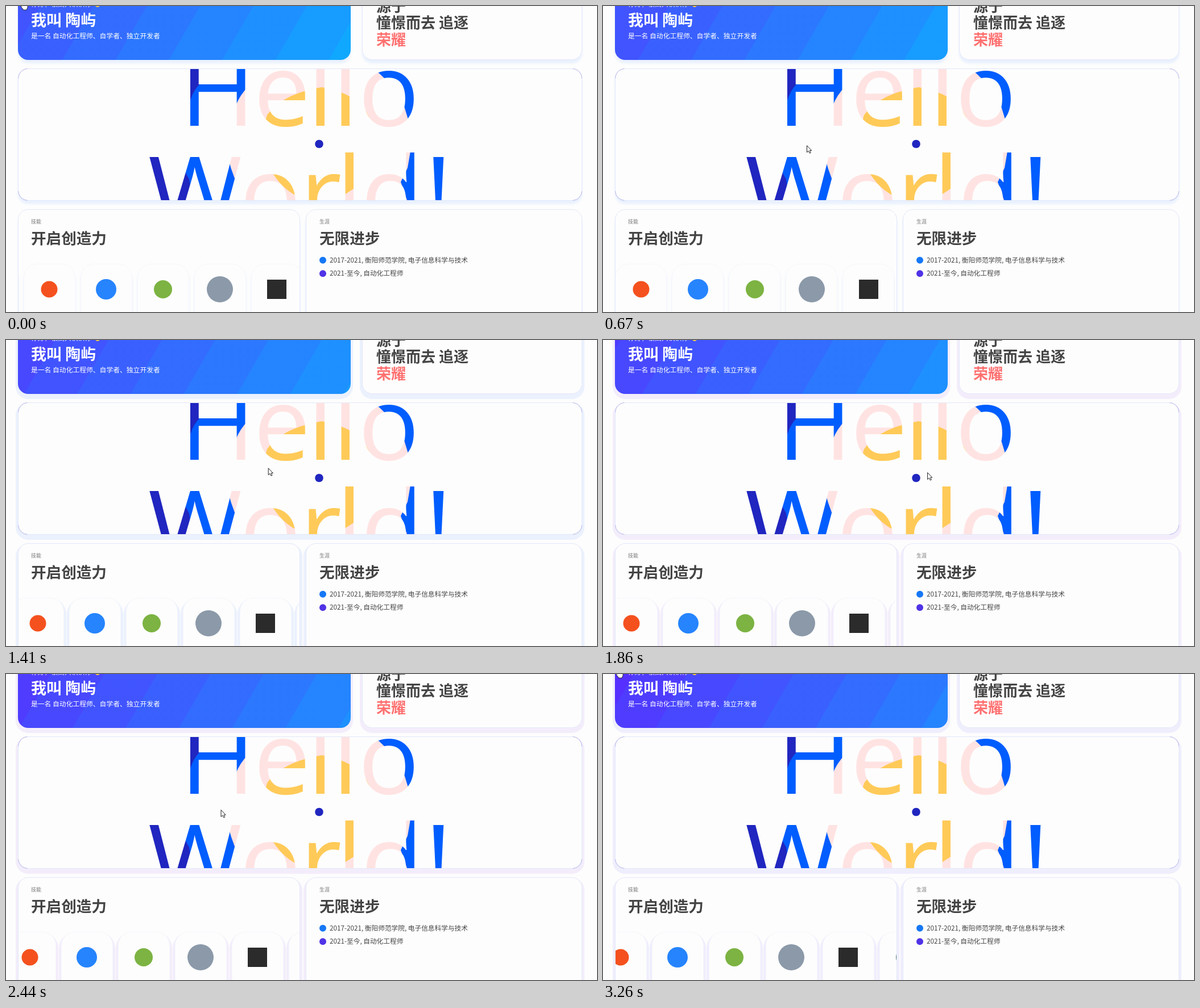
Animation of 1039x539 px, one loop 3.34 s. Source, as an HTML page:

```html
<!DOCTYPE html>
<html lang="zh">
<head>
<meta charset="utf-8">
<style>
html, body { margin: 0; width: 100%; height: 100%; overflow: hidden; background: #fdfdfd; }
#stage { position: absolute; width: 1039px; height: 539px; overflow: hidden; }
.card, .tile { position: absolute; box-sizing: border-box; background: #fdfdfd; border: 1px solid #e3e8fa; box-shadow: var(--shadow); }
.card { border-radius: 18px; }
.tile { top: 454px; width: 91px; height: 130px; border-radius: 24px; border-color: #f6f7fc; }
.tile i { position: absolute; left: 50%; top: 44px; transform: translate(-50%, -50%); }
#hero { border: 0; }
#strip { position: absolute; left: 22px; top: 0; width: 494px; height: 539px; overflow: hidden; }
svg { position: absolute; left: 0; top: 0; font-family: "Noto Sans CJK SC", "Noto Sans CJK", sans-serif; }
.big { font-weight: 700; font-size: 26.6px; fill: #444; }
.list { font-size: 11.7px; fill: #444; }
.label { font-size: 9px; fill: #777; }
.hello { font: 178px "Open Sans", sans-serif; }
</style>
</head>
<body>
<div id="stage">
  <div class="card" id="hero" style="left:21px;top:-40px;width:585px;height:134.5px"></div>
  <div class="card" style="left:626px;top:-40px;width:387px;height:135px"></div>
  <div class="card" style="left:21px;top:110px;width:992px;height:233px"></div>
  <div class="card" style="left:21px;top:358px;width:496px;height:220px"></div>
  <div class="card" style="left:527px;top:358px;width:486px;height:220px"></div>
  <div id="strip"></div>
  <svg width="1039" height="539">
    <defs>
      <clipPath id="words">
        <text class="hello" y="211" x="306.5 435.2 530.2 574.2 619.2">Hello</text>
        <text class="hello" y="393" x="250 411.2 517.2 581.2 624 736.5">World!</text>
      </clipPath>
      <clipPath id="panel"><rect x="22" y="111" width="990" height="231" rx="17"/></clipPath>
    </defs>
    <g fill="#fff">
      <text x="44" y="1" font-size="11.8">你好，很高兴认识你</text>
      <ellipse cx="161" cy="-2" rx="4" ry="4" fill="#ffc93c"/>
      <text x="44" y="35" font-size="27" font-weight="700">我叫 陶屿</text>
      <text x="44" y="56.5" font-size="11.8">是一名 自动化工程师、自学者、独立开发者</text>
    </g>
    <g class="big" style="font-size:26px">
      <text x="651" y="10">源于</text>
      <text x="651" y="39">憧憬而去 追逐</text>
      <text x="651" y="68.500" fill="#ff7070">荣耀</text>
    </g>
    <g clip-path="url(#panel)">
      <g clip-path="url(#words)">
        <rect x="240" y="110" width="560" height="235" fill="#ffe3e2"/>
        <path fill="#005dff" d="M310 110H424V144Q412 156 404 175V215H310Z
          M640 105Q690 145 701 180L707 200H740V105Z
          M245 250H385L396 287L405 312L410 345H245Z
          M712 250L706 285L694 310L706 345H800V250Z"/>
        <path fill="#2026bf" d="M310 110H340V138Q330 148 324 166H310Z
          M240 250H290L322 305L328 345H240Z"/>
        <path fill="#ffca58" d="M452 216L459 192Q485 155 555 143Q605 152 629 178L642 203L640 216Z
          M466 290Q485 322 512 335L530 345H570L597 331L611 322L625 250H470Z"/>
      </g>
      <circle cx="550.5" cy="243" r="7.3" fill="#2026bf"/>
    </g>
    <path fill="none" stroke="#b9b9ec" d="M21.5 127.500a17 17 0 0 1 16-17M996.500 110.500a17 17 0 0 1 16 17M1012.500 326a17 17 0 0 1-16 16.500M37.500 342.500a17 17 0 0 1-16-16.500"/>
    <text class="label" x="44" y="383.400">技能</text>
    <text class="big" x="44" y="419">开启创造力</text>
    <text class="label" x="551" y="383.400">生涯</text>
    <text class="big" x="551" y="419">无限进步</text>
    <circle cx="557" cy="447.700" r="6" fill="#1677f5"/>
    <circle cx="557" cy="471.200" r="6" fill="#5033e6"/>
    <text class="list" x="569" y="451.500">2017-2021, 衡阳师范学院, 电子信息科学与技术</text>
    <text class="list" x="569" y="475">2021-至今, 自动化工程师</text>
    <g id="cursor" stroke-linejoin="round">
      <path id="arrow" fill="#fff" stroke="#222" d="M.5.5V12.500L3.300 10L5.200 14L7.200 13.100L5.400 9.200H8.700Z"/>
      <path id="hand" fill="#fff" stroke="#222" d="M3 10V2Q4.500 0 6 2V7L12 9V13L10 17H5L0 11Q1 9 3 10Z"/>
    </g>
  </svg>
</div>
<script>
const LOOP = 3340, STEP = 63.3;
const $ = id => document.getElementById(id);

// colour, size, corner rounding of each icon
const icons = [
  ['#2b2b2b', 30, 0], ['#f4511e', 29, 50], ['#2684ff', 36, 50], ['#7cb342', 32, 50],
  ['#8b99a9', 46, 50], ['#2b2b2b', 34, 0], ['#4c7a80', 32, 50]
];
const tiles = icons.map(([color, size, round]) => {
  const tile = document.createElement('div');
  tile.className = 'tile';
  tile.innerHTML = `<i style="width:${size}px;height:${size}px;background:${color};border-radius:${round}%"></i>`;
  $('strip').append(tile);
  return tile;
});

// time, x, y of the pointer tip
const route = [
  [0, 26, -10], [670, 361.5, 248], [1410, 457.5, 225], [1860, 572, 233],
  [2440, 376, 239], [2880, 44, -2], [3260, 23, -10], [LOOP, 23, -10]
];
function pointer(t) {
  const i = route.findIndex((p, k) => k && t <= p[0]);
  const a = route[i - 1], b = route[i], f = (t - a[0]) / (b[0] - a[0]);
  return [a[1] + (b[1] - a[1]) * f, a[2] + (b[2] - a[2]) * f];
}

// diagonal bands of blue that drift to the right
function bands(sec) {
  const edge = green => (green - 82 + 10.8 * sec) / 0.148;
  const stops = [];
  for (let g = 36; g <= 180; g += 12) {
    const red = 82 - (g - 54) * 0.58;
    stops.push(`rgb(${red},${g},255) ${edge(g - 6)}px ${edge(g + 6)}px`);
  }
  return `linear-gradient(120deg, ${stops})`;
}

function shadow(t) {
  if (t < 1050) return '0 6px 4px 0 #e9f1fe';
  const color = t < 1640 ? '#ebf1fd' : t < 2650 ? '#f3edfb' : '#efeefd';
  return `0 5px 1px 4px ${color}`;
}

function draw(now) {
  const raw = now % LOOP;
  const t = Math.max(0, Math.floor((raw - 17) / STEP) * STEP + 30);
  $('hero').style.background = bands(t / 1000);
  $('stage').style.setProperty('--shadow', shadow(t));
  tiles.forEach((tile, i) => {
    tile.style.left = 76 + (i - 1) * 100 - 13.8 * t / 1000 - 45.5 - 22 + 'px';
  });
  const [x, y] = pointer(t), isHand = x < 40;
  $('cursor').setAttribute('transform', `translate(${x} ${y})`);
  $('hand').style.display = isHand ? '' : 'none';
  $('arrow').style.display = isHand ? 'none' : '';
  requestAnimationFrame(draw);
}
draw(performance.now());
</script>
</body>
</html>
```
